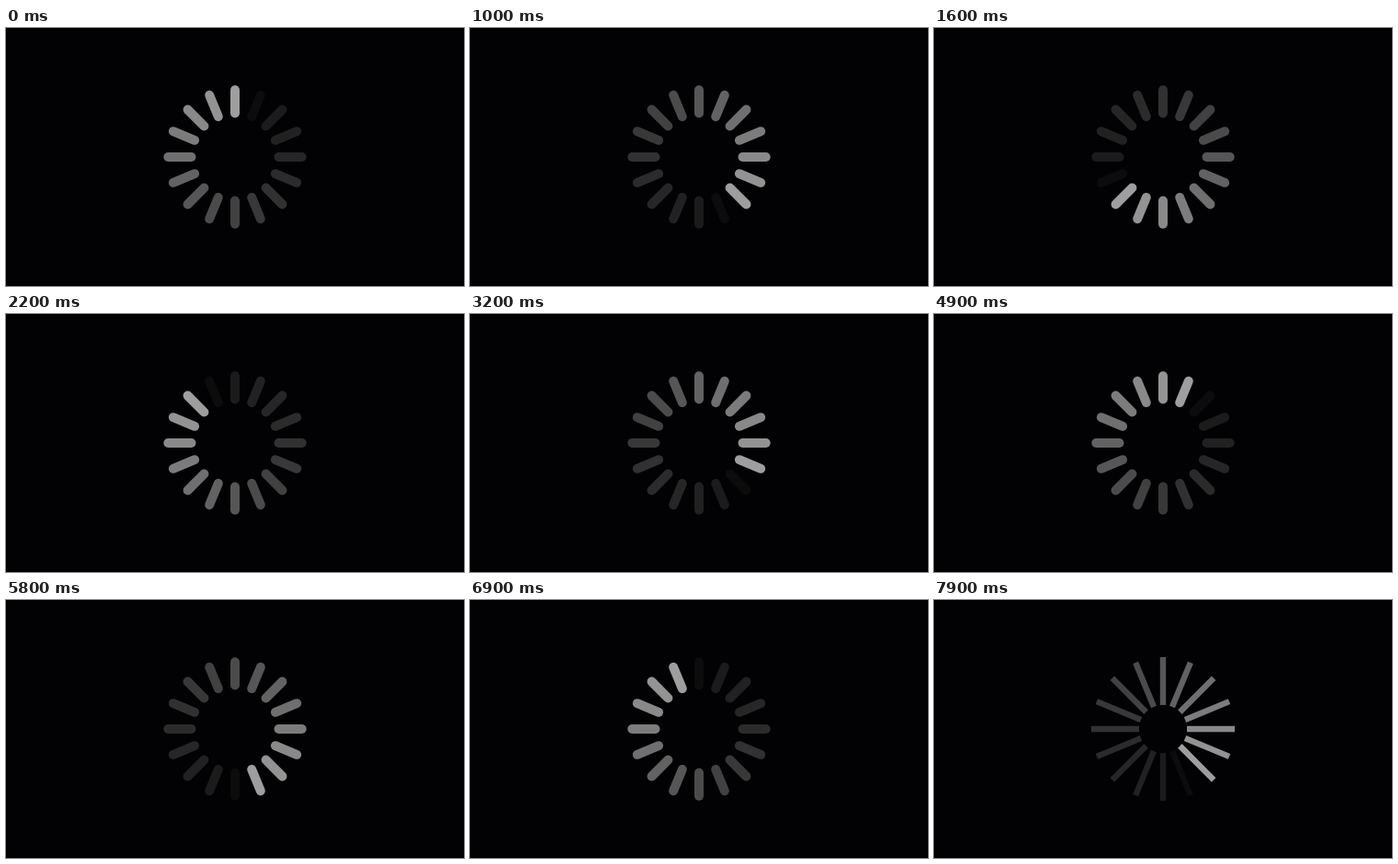
These frames come from a looping animation (498x280 px, 8000 ms). An HTML page:

```html
<!DOCTYPE html>
<html lang="en">
<head>
<meta charset="utf-8">
<title>Spinner</title>
<style>
  html, body { margin: 0; width: 100%; height: 100%; overflow: hidden; background: #020204; }
  svg { display: block; width: 100vw; height: 100vh; }
</style>
</head>
<body>
<svg viewBox="0 0 498 280"><g id="ring" transform="translate(249 140)"></g></svg>
<script>
const LOOP = 8000, SPOKES = 16, STEPS = 54, RESTYLE = 48;
const ring = document.getElementById('ring');

// Grey level by distance behind the leading spoke
const greys = [158, 147, 137, 124, 111, 98, 86, 75, 65, 56, 49, 43, 38, 33, 27, 12];

const styles = [
  { inner: 47.5, outer: 72.7, width: 10, cap: 'round' },
  { inner: 26, outer: 78, width: 6.4, cap: 'butt' }
];

// Step times: 150 ms apart, with an occasional 100 ms step
const shortSteps = new Set([5, 16, 23, 30, 41, 46, 53]);
const starts = [0, 300];
for (let n = 2; n <= STEPS; n++) {
  starts.push(starts[n - 1] + (shortSteps.has(n) ? 100 : 150));
}

const spokes = Array.from({ length: SPOKES }, (_, i) => {
  const line = document.createElementNS('http://www.w3.org/2000/svg', 'line');
  line.setAttribute('transform', `rotate(${i * 360 / SPOKES})`);
  return ring.appendChild(line);
});

function draw(time) {
  let step = STEPS;
  while (starts[step] > time) step--;
  const style = styles[step < RESTYLE ? 0 : 1];
  ring.setAttribute('stroke-width', style.width);
  ring.setAttribute('stroke-linecap', style.cap);
  spokes.forEach((line, i) => {
    const lag = (step - i + SPOKES * 4) % SPOKES;
    const grey = greys[lag];
    line.setAttribute('y1', -style.inner);
    line.setAttribute('y2', -style.outer);
    line.setAttribute('stroke', `rgb(${grey},${grey},${grey})`);
  });
}

const origin = performance.now();
function tick() {
  draw((performance.now() - origin) % LOOP);
  requestAnimationFrame(tick);
}
tick();
</script>
</body>
</html>
```
